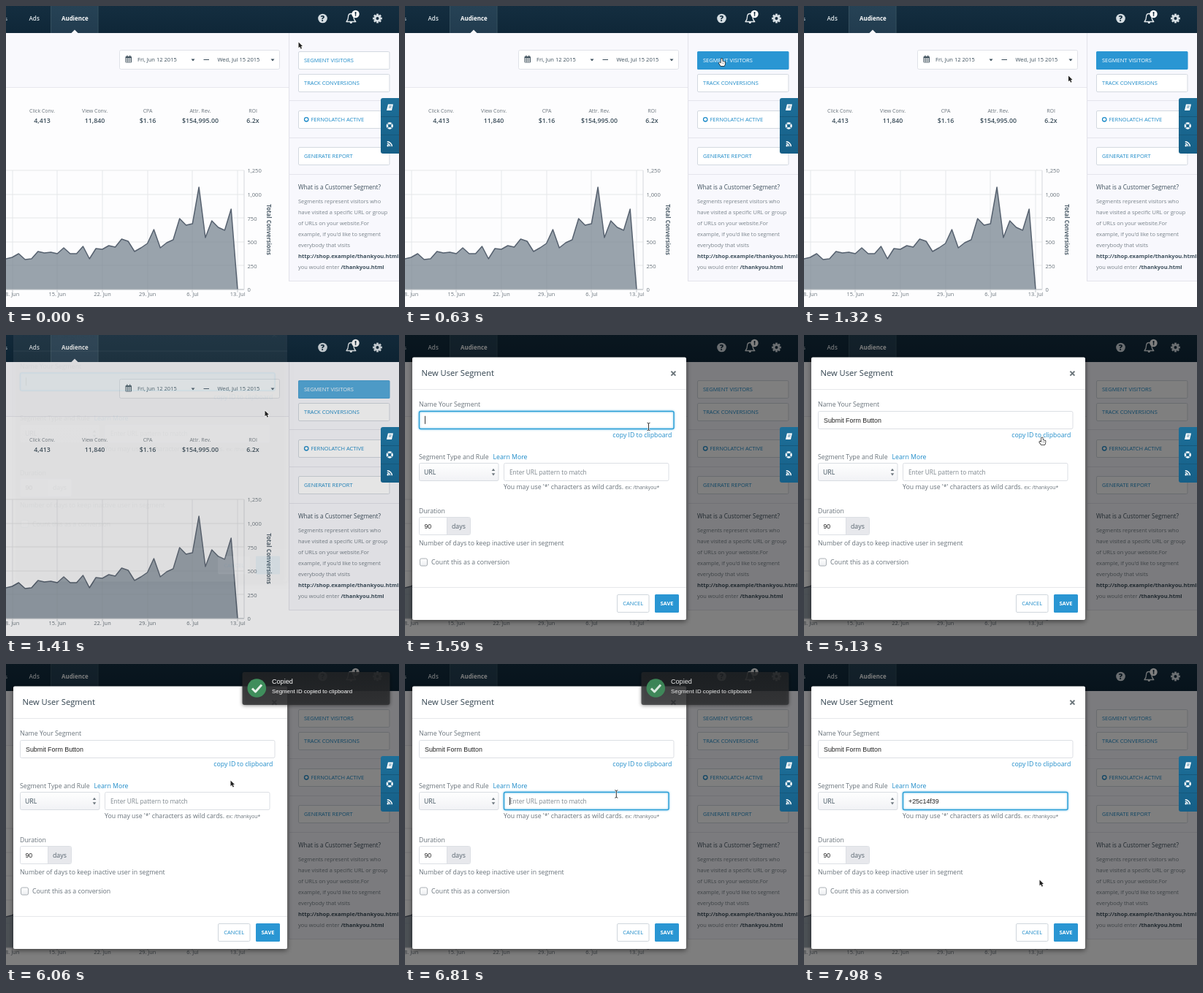
These frames come from a looping animation (538x412 px, 8 s). An HTML page with a canvas:

```html
<!DOCTYPE html>
<html lang="en">
<head>
<meta charset="utf-8">
<title>New user segment</title>
<style>
html, body { margin: 0; width: 100%; height: 100%; overflow: hidden; background: #fdfdfe; }
canvas { display: block; width: 538px; height: 412px; }
</style>
</head>
<body>
<canvas id="stage"></canvas>
<script>
const W = 538, H = 412, LOOP = 8000;
const SANS = '"Open Sans", sans-serif', ARIAL = '"Liberation Sans", Arial, sans-serif';
const BLUE = '#2a96d3', LINK = '#1f8cc9', INK = '#3d4f5c', GRAY = '#69737b';
const cv = document.getElementById('stage');
const dpr = window.devicePixelRatio || 1;
cv.width = W * dpr;
cv.height = H * dpr;
const c = cv.getContext('2d');

const clamp = v => Math.max(0, Math.min(1, v));
const ramp = (t, a, b) => clamp((t - a) / (b - a));
const smooth = p => p * p * (3 - 2 * p);

function text(s, x, y, size, color, weight = 400, align = 'left', font = SANS) {
  c.font = `${weight} ${size}px ${font}`;
  c.fillStyle = color;
  c.textAlign = align;
  c.fillText(s, x, y);
  return c.measureText(s).width;
}
function rect(x, y, w, h, color) {
  c.fillStyle = color;
  c.fillRect(x, y, w, h);
}
function box(x, y, w, h, r, fill, stroke, lw = 1) {
  c.beginPath();
  c.roundRect(x, y, w, h, r);
  if (fill) { c.fillStyle = fill; c.fill(); }
  if (stroke) { c.strokeStyle = stroke; c.lineWidth = lw; c.stroke(); }
}
function path(pts, fill, stroke, lw = 1, close = true) {
  c.beginPath();
  for (let i = 0; i < pts.length; i += 2) c.lineTo(pts[i], pts[i + 1]);
  if (close) c.closePath();
  if (stroke) { c.strokeStyle = stroke; c.lineWidth = lw; c.stroke(); }
  if (fill) { c.fillStyle = fill; c.fill(); }
}
function arc(x, y, r, fill, stroke, lw = 1, a = 0, b = Math.PI * 2) {
  c.beginPath();
  c.arc(x, y, r, a, b);
  if (fill) { c.fillStyle = fill; c.fill(); }
  if (stroke) { c.strokeStyle = stroke; c.lineWidth = lw; c.stroke(); }
}
function fade(y0, y1, a, b) {
  const g = c.createLinearGradient(0, y0, 0, y1);
  g.addColorStop(0, a);
  g.addColorStop(1, b);
  return g;
}

function nav() {
  rect(0, 0, W, 37, fade(0, 37, '#142e40', '#0f2738'));
  rect(61, 0, 65, 37, fade(0, 37, '#264255', '#223c4f'));
  rect(61, 0, 1, 37, '#35505f');
  rect(125.5, 0, 1, 37, '#35505f');
  path([89.5, 37, 94, 32.5, 98.5, 37], '#f9f9fd');
  text('s', 2, 20, 7.9, '#e3eaee', 400, 'right');
  text('Ads', 31.5, 20, 8.1, '#e3eaee', 600);
  text('Audience', 76, 20, 7.9, '#fff', 700);

  arc(433.5, 17, 6.3, '#d6dee3');
  text('?', 433.5, 20.8, 10.5, '#142c3d', 800, 'center');

  c.strokeStyle = '#e3e9ec';
  c.lineWidth = 1.3;
  c.beginPath();
  c.moveTo(466, 21.5);
  c.quadraticCurveTo(468.5, 19, 468.5, 15);
  c.bezierCurveTo(468.5, 9, 476, 9, 476, 15);
  c.quadraticCurveTo(476, 19, 478.8, 21.5);
  c.closePath();
  c.stroke();
  arc(472.3, 22.5, 1.6, '#e3e9ec');
  arc(478.5, 11, 5.2, '#fff');
  text('!', 478.5, 14.3, 9, '#142c3d', 800, 'center');

  c.save();
  c.translate(508.5, 17);
  for (let i = 0; i < 8; i++) {
    rect(-1.4, -6.4, 2.8, 4, '#d6dee3');
    c.rotate(Math.PI / 4);
  }
  c.restore();
  arc(508.5, 17, 4.7, '#d6dee3');
  arc(508.5, 17, 2, '#142c3d');
}

function dates() {
  rect(0, 37, 387, 74, '#f9f9fd');
  rect(0, 111, 387, 1, '#e7e7ee');
  box(155.5, 60.5, 219, 26, 2, '#fff', '#e0e2e8');
  box(163.5, 69, 8.5, 8.5, 1, '#445560');
  for (let i = 0; i < 9; i++)
    rect(164.4 + i % 3 * 2.4, 71.4 + Math.floor(i / 3) * 2, 1.8, 1.4, '#fff');
  rect(165.2, 67.6, 1.3, 2.4, '#445560');
  rect(169, 67.6, 1.3, 2.4, '#445560');
  text('Fri, Jun 12 2015', 180, 76.3, 7.55, INK);
  text('Wed, Jul 15 2015', 289.5, 76.3, 7.55, INK);
  for (const x of [256, 365]) path([x - 2.5, 72.5, x + 2.5, 72.5, x, 75.5], INK);
  rect(270.5, 73, 7.5, 1, INK);
}

const STATS = [['Click Conv.', '4,413', 49.5], ['View Conv.', '11,840', 121.5], ['CPA', '$1.16', 194],
  ['Attr. Rev.', '$154,995.00', 266], ['ROI', '6.2x', 338]];
const LEVELS = [346, 344, 339, 347, 346, 336, 338, 337, 339, 331, 339, 339, 329, 346, 332, 333, 328, 330, 319,
  322, 336, 331, 325, 306, 331, 324, 320, 291, 300, 298, 248, 317, 294, 303, 307, 278, 388];
const DAYS = ['8. Jun', '15. Jun', '22. Jun', '29. Jun', '6. Jul', '13. Jul'];

function report() {
  for (const [label, value, x] of STATS) {
    text(label, x, 145.6, 7, GRAY, 400, 'center');
    text(value, x, 160.2, 8.8, INK, 600, 'center');
  }
  for (let i = 0; i < 6; i++) {
    const y = 225 + i * 32.6, x = 8.6 + i * 61.7;
    rect(0, Math.round(y) - .5, 326, 1, '#e6e7ea');
    rect(Math.round(x) - .5, 225, 1, 163, '#e6e7ea');
    rect(Math.round(x) - .5, 388, 1, 4, '#c3c8cc');
    text((1250 - i * 250).toLocaleString('en-US'), 330.5, y + 3.4, 7.6, GRAY);
    text(DAYS[i], x, 397.3, 7.4, GRAY, 400, 'center');
  }
  const line = LEVELS.flatMap((y, i) => [317 - (36 - i) * 8.814, y]);
  path([...line, -1, 388], 'rgba(112,126,138,.7)');
  c.lineJoin = 'round';
  path(line, null, '#56616f', 1.5, false);
  rect(0, 387.5, 326, 1, '#b9bfc4');
  rect(325.5, 225, 1, 163, '#d5d8dc');
  c.save();
  c.translate(356.5, 306);
  c.rotate(Math.PI / 2);
  text('Total Conversions', 0, 0, 7.9, '#51616d', 700, 'center');
  c.restore();
}

const NOTES = ['Segments represent visitors who', 'have visited a specific URL or group', 'of URLs on your website.For',
  "example, if you'd like to segment", 'everybody that visits'];

function sidebar(hover) {
  rect(387, 37, 151, 340, '#f8f8fd');
  rect(387, 37, 1, 340, '#e2e2ea');
  for (const y of [129, 180, 230, 376]) rect(387, y, 151, 1, '#e4e4ec');
  [['SEGMENT VISITORS', 62], ['TRACK CONVERSIONS', 93], ['FERNOLATCH ACTIVE', 143], ['GENERATE REPORT', 193]]
    .forEach(([label, y], i) => {
      box(400.5, y + .5, 124.5, 24, 1.5, '#fff', '#d3d9e0');
      if (!i && hover) {
        c.globalAlpha = hover;
        box(400, y, 125.5, 25, 1.5, BLUE);
        c.globalAlpha = 1;
      }
      const lit = !i && hover > .5;
      text(label, i === 2 ? 417.5 : 408, y + 14.7, 7.5, lit ? '#fff' : LINK);
    });
  arc(411.2, 155.3, 2.7, null, LINK, 1.3);
  text('What is a Customer Segment?', 400, 250.5, 8.15, INK);
  NOTES.forEach((s, i) => text(s, 400, 269.7 + i * 15, 7.45, '#78828a'));
  text('http://shop.example/thankyou.html', 400, 344.6, 7.6, INK, 700);
  const w = text('you would enter ', 400, 359.6, 7.45, '#78828a');
  text('/thankyou.html', 400 + w, 359.6, 7.5, INK, 700);
}

function sideTab() {
  box(513, 126, 30, 76, 3, fade(126, 202, '#1d6f99', '#165f87'));
  rect(513, 151, 25, 1, '#15587c');
  rect(513, 176, 25, 1, '#15587c');
  path([523, 134.5, 530, 134.5, 528, 143, 521, 143], '#fff');
  path([524.3, 137, 528, 137], null, '#1b6a94', .8, false);
  path([523.8, 139, 527.5, 139], null, '#1b6a94', .8, false);
  arc(525.3, 164, 3.5, null, '#fff', 2.3);
  for (let i = 0; i < 4; i++) {
    const a = Math.PI * (.25 + i / 2), x = Math.cos(a), y = Math.sin(a);
    path([525.3 + x * 2.8, 164 + y * 2.8, 525.3 + x * 4.2, 164 + y * 4.2], null, '#1a658e', 1.4, false);
  }
  arc(522.8, 191.3, 1.2, '#fff');
  for (const r of [3.8, 6.6]) arc(521.8, 192.3, r, null, '#fff', 1.4, -Math.PI / 2, 0);
}

function field(x, y, w, focused) {
  if (focused) {
    c.save();
    c.shadowColor = 'rgba(42,160,220,.55)';
    c.shadowBlur = 3 * dpr;
    box(x + .5, y + .5, w - 1, 24, 2, '#fff', '#2a9fd6', 1.4);
    c.restore();
  } else box(x + .5, y + .5, w - 1, 24, 2, '#fff', '#dcdfe4');
}

const NAME = 'Submit Form Button';
function typed(t) {
  if (t < 2790) return '';
  if (t < 3030) return NAME.slice(0, t < 2830 ? 1 : t < 2880 ? 2 : 3);
  if (t < 3210) return NAME.slice(0, 4 + Math.min(2, Math.floor((t - 3030) / 60)));
  return NAME.slice(0, t < 3840 ? 7 + Math.floor((t - 3210) / 62) : t < 3900 ? 17 : 18);
}
function caret(x, y) {
  rect(x, y, .9, 11, '#222');
}

function modal(t) {
  const nameFocus = t < 4920, urlFocus = t >= 6570;
  c.save();
  c.shadowColor = 'rgba(0,0,0,.5)';
  c.shadowBlur = 7 * dpr;
  c.shadowOffsetY = 2 * dpr;
  box(10, 30.5, 375, 359.5, 2, '#fff');
  c.restore();
  rect(10, 74, 375, 1, '#e6e7ea');
  rect(10, 345, 375, 1, '#e6e7ea');
  text('New User Segment', 22.5, 56.4, 11.2, '#31424e');
  path([364.4, 49.6, 370.4, 55.6], null, '#6c767c', 2, false);
  path([370.4, 49.6, 364.4, 55.6], null, '#6c767c', 2, false);

  text('Name Your Segment', 19, 98.4, 8.8, GRAY);
  field(19, 104, 349.5, nameFocus);
  const s = typed(t);
  const w = text(s, 27, 119.7, 8.9, '#222', 400, 'left', ARIAL);
  const blinkOff = (t >= 2050 && t < 2550) || t >= 4170;
  if (nameFocus && !blinkOff) caret(27 + w, 110.8);
  text('copy ID to clipboard', 365.3, 140.4, 8.72, LINK, 400, 'right');

  text('Segment Type and Rule', 19, 169.7, 8.75, GRAY);
  text('Learn More', 120.5, 169.7, 8.75, LINK);
  box(19.5, 175.5, 108.5, 24, 2, fade(175, 200, '#fff', '#f1f2f5'), '#d8dce1');
  text('URL', 26, 190.7, 8.75, INK);
  path([118.7, 186, 123.3, 186, 121, 182.8], '#6d777e');
  path([118.7, 189.2, 123.3, 189.2, 121, 192.4], '#6d777e');

  field(135, 175, 226.5, urlFocus);
  let end = 0;
  if (t < 7380) text('Enter URL pattern to match', 143, 190.6, 8.3, '#7c858c');
  else end = text('+25c14f39', 143, 190.7, 8.9, '#222', 400, 'left', ARIAL);
  if (urlFocus && (t < 7080 || (t >= 7380 && t < 7880))) caret(143 + end, 182);
  const hint = text("You may use '*' characters as wild cards. ", 135, 211.4, 8.75, GRAY);
  text('ex: /thankyou*', 135 + hint, 211.4, 6.8, GRAY);

  text('Duration', 19, 244, 8.75, GRAY);
  box(19.5, 249.5, 70, 24, 2, '#fff', '#dcdfe4');
  rect(57, 250, 32, 23, '#e7e8ec');
  rect(57, 250, 1, 23, '#dcdfe4');
  text('90', 26.5, 264.6, 8.75, '#222', 400, 'left', ARIAL);
  text('days', 64, 264.8, 8.75, '#55626c');
  text('Number of days to keep inactive user in segment', 19, 288, 8.73, GRAY);
  box(20.5, 306, 10, 10, 2, fade(306, 316, '#fff', '#eceef0'), '#a9afb4');
  text('Count this as a conversion', 36, 314.4, 8.75, GRAY);

  box(290.5, 355.5, 43.5, 24, 1.5, '#fff', '#cfd6dc');
  text('CANCEL', 312.2, 370.4, 7.5, LINK, 400, 'center');
  box(342, 355, 33, 25, 1.5, BLUE);
  text('SAVE', 358.5, 370.4, 7.5, '#fff', 700, 'center');
}

function toast(alpha) {
  c.save();
  c.globalAlpha = alpha;
  c.shadowColor = 'rgba(0,0,0,.55)';
  c.shadowBlur = 5 * dpr;
  c.shadowOffsetY = dpr;
  box(323.5, 11, 202, 45, 3, fade(11, 56, 'rgba(34,36,38,.86)', 'rgba(44,45,47,.83)'));
  c.shadowColor = 'transparent';
  arc(343.3, 33, 12.8, '#3f8e5c');
  path([337, 33.5, 341.5, 38, 350, 28.5], null, '#e9f3ec', 3, false);
  text('Copied', 364, 27.2, 9.1, '#fff', 400, 'left', ARIAL);
  text('Segment ID copied to clipboard', 364, 40, 7.9, '#fff', 400, 'left', ARIAL);
  c.restore();
}

const TRACK = [[0, 400.5, 49.5], [750, 436, 74], [1020, 436, 74], [1320, 362, 95.5], [1590, 333.5, 125.5],
  [4320, 333.5, 125.5], [4450, 326, 140.5], [5880, 326, 140.5], [6240, 289.3, 178], [7620, 289.3, 178],
  [7980, 322.5, 295.5], [LOOP, 322.5, 295.5]];

function pointer(t) {
  if (t >= 1650 && t < 4320) return;
  const i = TRACK.findIndex(k => k[0] > t);
  const [t0, x0, y0] = TRACK[i - 1], [t1, x1, y1] = TRACK[i];
  const p = smooth(ramp(t, t0, t1));
  const x = x0 + (x1 - x0) * p, y = y0 + (y1 - y0) * p;
  const over = (l, top, r, b) => x >= l && x <= r && y >= top && y <= b;
  const open = t > 1500;
  const hand = open ? over(284, 131, 366, 145) : over(400, 62, 525, 87);
  const beam = open && (over(19, 104, 368, 129) || over(135, 175, 361, 200));
  c.save();
  c.translate(x, y);
  c.lineJoin = 'round';
  if (beam) {
    for (const [color, lw] of [['rgba(255,255,255,.8)', 2.2], ['#333', 1]]) {
      path([0, -4.5, 0, 4.5], null, color, lw, false);
      path([-2, -5.3, 0, -4.5, 2, -5.3], null, color, lw, false);
      path([-2, 5.3, 0, 4.5, 2, 5.3], null, color, lw, false);
    }
  } else if (hand) {
    path([-.9, 0, .7, 0, .9, 3.3, 4.6, 4.4, 4.4, 7.4, 3.4, 9.6, -1.3, 9.6, -3.8, 6, -3, 5, -1, 6.2],
      '#fff', '#222', 1.5);
    path([1, 5, 1, 6.5], null, '#444', .6, false);
    path([2.7, 5.3, 2.7, 6.7], null, '#444', .6, false);
  } else {
    path([0, 0, 0, 7.8, 1.8, 6.2, 3.1, 9.2, 4.5, 8.6, 3.2, 5.7, 5.5, 5.6], '#222', '#fff', 1.4);
  }
  c.restore();
}

function draw(now) {
  const t = now % LOOP;
  c.setTransform(dpr, 0, 0, dpr, 0, 0);
  c.globalAlpha = 1;
  rect(0, 0, W, H, '#fdfdfe');
  report();
  dates();
  sidebar(ramp(t, 380, 500) * (1 - ramp(t, 1380, 1530)));
  nav();
  rect(0, 0, W, H, `rgba(0,0,0,${.5 * ramp(t, 1380, 1530)})`);
  sideTab();
  const open = ramp(t, 1400, 1570);
  if (open) {
    c.save();
    c.globalAlpha = open;
    c.translate(0, -60 * (1 - open) ** 2);
    modal(t);
    c.restore();
  }
  const shown = ramp(t, 5595, 5625) * (1 - ramp(t, 6780, 7110));
  if (shown) toast(shown);
  pointer(t);
  requestAnimationFrame(draw);
}
requestAnimationFrame(draw);
</script>
</body>
</html>
```
